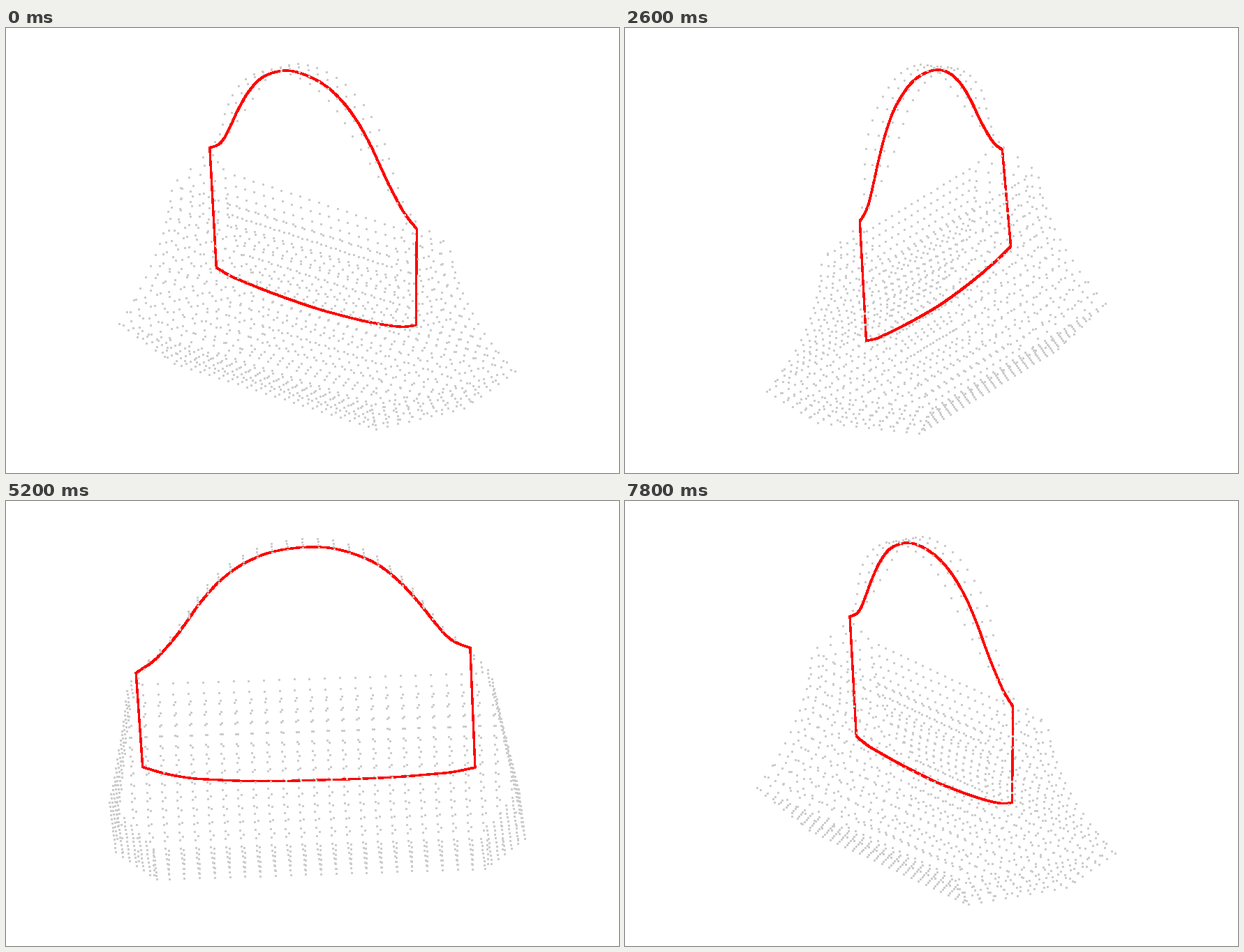
A matplotlib script that plays this animation: 878 px wide and 638 px high, repeating every 8 s.

```python
import numpy as np
import matplotlib.pyplot as plt
from matplotlib.animation import FuncAnimation

W, H, DPI = 878, 638, 100
FRAMES, INTERVAL = 40, 200
GRAY, RED = (0.8, 0.8, 0.8, 1), (1, 0, 0, 1)

# Camera: orbit axis on screen, sine of elevation, roll and lean of the axis
CX, CY = 446, 458.5
TILT, ROLL, LEAN = 0.272, 0.025, 0.05
STEP, FRONT, SKEW = 9, 26, 1.6

RIM, PEAK, BASE = 190, 235, -55


def half_length(z):
    return np.interp(z, [BASE, 0, RIM, PEAK], [235, 293, 260, 231])


def half_depth(z):
    if z > RIM:
        return 49 * (PEAK - z) / (PEAK - RIM)
    if z >= 0:
        return 49 + 82 * (1 - z / RIM) ** 2
    return 131 - 51 * z / BASE


def spline(pts, n=40):
    """Catmull-Rom curve through the given points."""
    p = np.asarray(pts, float)
    p = np.vstack([2 * p[0] - p[1], p, 2 * p[-1] - p[-2]])
    t = np.linspace(0, 1, n, endpoint=False)[:, None]
    parts = []
    for a, b, c, d in zip(p, p[1:], p[2:], p[3:]):
        parts.append(0.5 * (2 * b + (c - a) * t + (2 * a - 5 * b + 4 * c - d) * t**2
                            + (3 * b - a - 3 * c + d) * t**3))
    return np.vstack(parts + [p[-2:-1]])


def resample(curve, gap):
    """Evenly spaced points along a polyline."""
    s = np.r_[0, np.cumsum(np.linalg.norm(np.diff(curve, axis=0), axis=1))]
    u = np.linspace(0, s[-1], int(round(s[-1] / gap)) + 1)
    return np.column_stack([np.interp(u, s, c) for c in curve.T])


# Points as (x along the bag, y across it, z up)
handle = spline([
    (-249, 0, 220), (-221, 0, 238), (-192.5, 0, 267), (-173.5, 0, 290),
    (-150, 0, 320), (-118.5, 0, 351), (-82, 0, 374), (-41.6, 0, 387.7),
    (8.6, 0, 392.2), (51.4, 0, 386.8), (97.5, 0, 368.3), (131, 0, 342),
    (159.5, 0, 309.3), (178, 0, 284), (197, 0, 260), (211.5, 0, 248.6),
    (231, 0, 240.5)])
floor = spline([
    (229.5, 0, 69), (197, 0, 63.5), (167, 0, 61.5), (117, 0, 59), (57, -1, 57.8),
    (-8, -2, 57.8), (-43, -1, 58.3), (-97, 0, 60.2), (-143, 0, 63.5),
    (-178, 0, 67), (-213, -3, 73.5), (-246, -7.5, 83)])
loop = resample(np.vstack([handle, floor, handle[:1]]), 0.8)


def build_bag():
    pts = []
    columns = np.arange(-13, 14) * 21.75
    lip = np.linspace(0, BASE, 7)[1:]

    # Front and back panels, down to the edge of the base
    for z in np.r_[np.linspace(RIM, 0, 13), lip]:
        y = half_depth(z)
        for x in columns[np.abs(columns) < half_length(z) - 4]:
            pts += [(x, y, z), (x, -y, z)]

    # End panels
    for z in np.r_[np.linspace(PEAK - 8, 0, 16), lip]:
        y, x = half_depth(z), half_length(z)
        for v in np.linspace(-y, y, max(1, round(2 * y / 21)) + 1):
            pts += [(x, v, z), (-x, v, z)]

    # Base
    for y in np.linspace(-53, 53, 5):
        pts += [(x, y, BASE) for x in columns if abs(x) < 235]

    # Handle strap, tapering towards its ends
    for x, _, z in resample(handle, 22)[1:-1]:
        w = 24 * np.clip((z - 225) / 100, 0.2, 1)
        pts += [(x, v * w, z + 5) for v in np.linspace(-1, 1, 4 if w > 15 else 2)]
    return np.array(pts)


bag = build_bag()
cloud = np.vstack([bag, loop])
is_loop = np.arange(len(cloud)) >= len(bag)
colors = np.where(is_loop[:, None], RED, GRAY)
sizes = (np.where(is_loop, 3.3, 3.0) * 72 / DPI) ** 2


def project(k):
    """Screen positions and nearness of all points at step k."""
    a = np.radians(STEP * (k - FRONT) + SKEW)
    x, y, z = cloud.T
    u = x * np.cos(a) + y * np.sin(a)
    v = y * np.cos(a) - x * np.sin(a)
    px = CX + u + ROLL * TILT * v - LEAN * z
    py = CY - (ROLL * u + z - TILT * v)
    return np.column_stack([px, py]), 0.962 * v + 0.28 * z


# The small margin keeps the pixel size from being rounded down
fig = plt.figure(figsize=((W + 0.01) / DPI, (H + 0.01) / DPI), dpi=DPI,
                 facecolor="white")
ax = fig.add_axes([0, 0, 1, 1])
ax.set(xlim=(0, W), ylim=(H, 0))
ax.axis("off")
dots = ax.scatter(*cloud[:, :2].T, s=sizes, c=colors, marker="s", linewidths=0,
                  antialiased=False)


def update(k):
    xy, near = project(k)
    order = np.argsort(near)
    xy[~is_loop] = np.floor(xy[~is_loop]) + 0.5
    dots.set_offsets(xy[order])
    dots.set_facecolors(colors[order])
    dots.set_sizes(sizes[order], DPI)
    return [dots]


anim = FuncAnimation(fig, update, frames=FRAMES, interval=INTERVAL,
                     repeat=True, repeat_delay=0)
plt.show()
```
